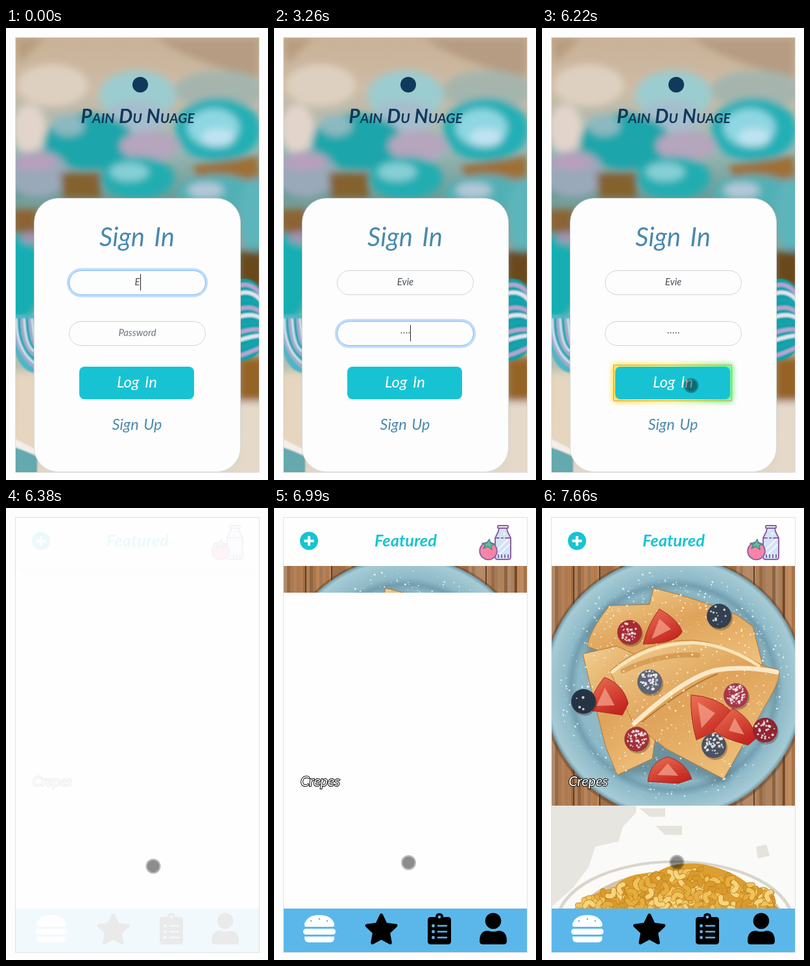
These frames come from a looping animation (404 by 694 pixels, 8 s). An HTML page:

```html
<!DOCTYPE html>
<html lang="en">
<head>
<meta charset="utf-8">
<title>Recipe app sign in</title>
<style>
html, body { margin: 0; width: 100%; height: 100%; overflow: hidden; background: #fdfdfd; }
svg { display: block; }
text { font-family: Lato, "Open Sans", sans-serif; font-style: italic; }
.mid { text-anchor: middle; }
.field { fill: #fdfdfd; stroke: #ced4da; }
.ring rect { fill: none; stroke: #80bdff; }
.ring rect:first-child { stroke: #007bff; stroke-opacity: .25; stroke-width: 3.2; }
.typed { font-size: 15px; fill: #495057; }
.dots { font: 6.65px "Liberation Mono", monospace; fill: #495057; }
.caret { fill: #222; }
</style>
</head>
<body>
<svg width="404" height="694" viewBox="0 0 404 694">
<defs>
  <clipPath id="screen"><rect x="15" y="15" width="375" height="667"/></clipPath>
  <clipPath id="crepeClip"><rect id="crepeWindow" x="15" y="89" width="375" height="41"/></clipPath>
  <clipPath id="pastaClip"><rect x="15" y="457" width="375" height="158"/></clipPath>
  <filter id="soft" x="-30%" y="-30%" width="160%" height="160%"><feGaussianBlur stdDeviation="6"/></filter>
  <filter id="edge" x="-30%" y="-30%" width="160%" height="160%"><feGaussianBlur stdDeviation="1.2"/></filter>
  <filter id="glowBlur" x="-20%" y="-50%" width="140%" height="200%"><feGaussianBlur stdDeviation="4"/></filter>
  <linearGradient id="tan" x2="0" y2="1">
    <stop stop-color="#c9b296"/><stop offset=".12" stop-color="#cdbba6"/>
    <stop offset=".25" stop-color="#9cb9b5"/><stop offset=".36" stop-color="#6f9c98"/><stop offset="1" stop-color="#e3d6c5"/>
  </linearGradient>
  <linearGradient id="glow"><stop stop-color="#ffd21c"/><stop offset=".45" stop-color="#f3ee55"/><stop offset="1" stop-color="#4cf06a"/></linearGradient>
  <linearGradient id="golden" x2=".7" y2="1">
    <stop stop-color="#f2d193"/><stop offset=".5" stop-color="#dfa35a"/><stop offset="1" stop-color="#eec07b"/>
  </linearGradient>
  <radialGradient id="plate">
    <stop stop-color="#9cc3cf"/><stop offset=".74" stop-color="#8db8c6"/><stop offset=".79" stop-color="#739fb0"/>
    <stop offset=".84" stop-color="#8fbac8"/><stop offset=".97" stop-color="#a6cbd5"/><stop offset="1" stop-color="#6f98a8"/>
  </radialGradient>
  <linearGradient id="berryRed" x2=".6" y2="1"><stop stop-color="#ec7254"/><stop offset="1" stop-color="#c32620"/></linearGradient>
</defs>

<g clip-path="url(#screen)">
  <g id="login">
    <rect x="15" y="15" width="375" height="667" fill="url(#tan)"/>
    <g filter="url(#soft)">
      <path d="M230 15H390V75Q300 60 230 15Z" fill="#b59c82"/>
      <path d="M15 15H60L20 55Z" fill="#b79d80"/>
      <ellipse cx="72" cy="88" rx="54" ry="32" fill="#ded0c0"/>
      <ellipse cx="36" cy="155" rx="26" ry="38" fill="#e2d4cb"/>
      <ellipse cx="330" cy="95" rx="70" ry="30" fill="#a5b5ad"/>
      <ellipse cx="203" cy="103" rx="59" ry="38" fill="#9bcccf"/>
      <ellipse cx="200" cy="137" rx="48" ry="25" fill="#a6bdcc"/>
      <ellipse cx="128" cy="175" rx="70" ry="43" fill="#1aa5aa"/>
      <ellipse cx="96" cy="150" rx="25" ry="16" fill="#8bb9c1"/>
      <ellipse cx="222" cy="181" rx="46" ry="23" fill="#b5a5bd"/>
      <ellipse cx="327" cy="156" rx="66" ry="49" fill="#22afb5"/>
      <ellipse cx="320" cy="153" rx="40" ry="29" fill="#8ed7e2"/>
      <ellipse cx="327" cy="168" rx="25" ry="14" fill="#bfe3f1"/>
      <ellipse cx="50" cy="224" rx="46" ry="36" fill="#9aa9b9"/>
      <ellipse cx="46" cy="206" rx="32" ry="12" fill="#b99fbd"/>
      <path d="M84 222H146V262H88Z" fill="#84622f"/>
      <path d="M288 211L390 196V232L300 240Z" fill="#9e7036"/>
      <ellipse cx="203" cy="230" rx="57" ry="33" fill="#23adb1"/>
      <ellipse cx="190" cy="221" rx="30" ry="14" fill="#86cfd6"/>
      <ellipse cx="326" cy="253" rx="62" ry="28" fill="#51b0b5"/>
      <ellipse cx="308" cy="249" rx="28" ry="12" fill="#b4c8d8"/>
      <ellipse cx="384" cy="287" rx="25" ry="56" fill="#5cb5bb"/>
      <path d="M10 278H50V324H10Z" fill="#8b6433"/>
      <ellipse cx="20" cy="382" rx="38" ry="67" fill="#12aeb2"/>
      <ellipse cx="38" cy="322" rx="15" ry="9" fill="#a594b4"/>
      <path d="M358 342H400V398H358Z" fill="#69491f"/>
      <path d="M358 505H400V573H358Z" fill="#966326"/>
      <path d="M358 573H400V690H358Z" fill="#e5d9c9"/>
      <path d="M10 528H50V650H10Z" fill="#e6d6bf"/>
    </g>
    <g filter="url(#edge)">
      <path d="M12 440H48V530Q18 528 12 485Z" fill="#4fb6c3"/>
      <path d="M356 386Q390 380 396 415V490Q382 512 356 512Z" fill="#10a1a9"/>
      <g id="frosting" fill="none" stroke-width="6"/>
      <path d="M12 641L48 658V686H12Z" fill="#64a9ae"/>
      <path d="M12 630L64 656V662L12 643Z" fill="#f4eee8"/>
    </g>
    <circle cx="207" cy="87" r="12" fill="#10395c"/>
    <text class="mid" x="203" y="146" font-size="30" font-weight="700" fill="#10395c" style="font-variant:small-caps">Pain Du Nuage</text>

    <rect x="43.500" y="261.500" width="318" height="420" rx="37" fill="#fdfdfd" stroke="#dadada"/>
    <text class="mid" x="202" y="335" font-size="40" word-spacing="5" fill="#4a89ae">Sign In</text>
    <rect class="field" x="97.500" y="372.500" width="210" height="37" rx="18.500"/>
    <rect class="field" x="97.500" y="450.500" width="210" height="37" rx="18.500"/>
    <g class="ring" id="nameRing"><rect x="95.400" y="370.400" width="214.200" height="41.200" rx="20.600"/><rect x="97.500" y="372.500" width="210" height="37" rx="18.500"/></g>
    <g class="ring" id="passRing"><rect x="95.400" y="448.400" width="214.200" height="41.200" rx="20.600"/><rect x="97.500" y="450.500" width="210" height="37" rx="18.500"/></g>
    <text class="mid typed" id="name" x="202.500" y="395"></text>
    <text class="mid" id="hint" x="202.500" y="473" font-size="14.800" fill="#6c757d">Password</text>
    <text class="mid dots" id="pass" x="202.500" y="470"></text>
    <rect class="caret" id="nameCaret" y="378" width="1" height="25"/>
    <rect class="caret" id="passCaret" y="456" width="1" height="25"/>

    <g id="glowBox"><rect x="109" y="516" width="185" height="58" rx="5" fill="url(#glow)" filter="url(#glowBlur)"/></g>
    <rect x="113" y="520" width="177" height="50" rx="8" fill="#17c3d3"/>
    <rect id="outline" x="110.500" y="517.500" width="182" height="55" fill="none" stroke="#e3a03c"/>
    <text class="mid" x="202" y="552" font-size="24" word-spacing="3" fill="#fff">Log In</text>
    <text class="mid" x="202" y="617" font-size="23.500" word-spacing="2" fill="#4a89ae">Sign Up</text>
  </g>

  <g id="home">
    <rect x="15" y="15" width="375" height="667" fill="#fefefe"/>
    <g id="page">
      <path id="shade" d="M15 89H390V94Q378 107 330 107H75Q27 107 15 94Z" fill="#e9e9e9"/>
      <g id="crepes" clip-path="url(#crepeClip)">
        <g id="planks"/>
        <circle cx="203" cy="276" r="204" fill="#513820" opacity=".4"/>
        <circle cx="203" cy="275" r="200" fill="url(#plate)"/>
        <path d="M68 225L72 190L104 150L166 148L172 123L300 164L326 186L342 246L364 268L282 424L232 410L120 410Z" fill="#41606c" opacity=".45" filter="url(#soft)"/>
        <g fill="url(#golden)" stroke="#b97832" stroke-width="1">
          <path d="M70 213Q72 190 104 150L166 148L172 123Q240 139 302 165L325 182L340 240L210 260Z"/>
          <path d="M63 224L115 212L190 245L170 385L116 410L98 366L72 262Z"/>
          <path d="M105 250Q160 202 232 203Q282 207 340 242L364 248Q370 258 352 290L280 416L192 370L140 330Z"/>
        </g>
        <g fill="none" stroke-linecap="round">
          <path d="M108 252Q164 206 236 207Q284 210 334 242" stroke="#f9e4b7" stroke-width="5"/>
          <path d="M142 331Q220 260 268 249Q312 242 362 252" stroke="#fae9c7" stroke-width="7"/>
          <path d="M152 330Q222 274 270 255" stroke="#b97734" stroke-width="2"/>
          <path d="M125 250Q185 222 240 226" stroke="#c98639" stroke-width="8" opacity=".55"/>
        </g>
        <g id="sugar" fill="#fff"/>
        <g fill="url(#berryRed)" stroke="#a82820">
          <path d="M181 155Q211 172 216 190Q208 208 156 209Q162 180 181 155Z"/>
          <path d="M96 260Q125 270 133 300L124 318L70 310Q78 282 96 260Z"/>
          <path d="M230 287Q270 290 292 312L278 338L238 356Q228 319 230 287Z"/>
          <path d="M294 307Q325 325 330 354L318 364Q278 354 264 341Z"/>
          <path d="M163 420Q166 390 194 382Q222 390 231 416L210 423Z"/>
        </g>
        <g fill="#f5a18a"><path d="M181 170L199 186L169 201ZM97 276L112 303L84 304ZM240 298L267 315L246 338ZM297 322L312 348L288 342ZM178 410L194 392L210 411Z" opacity=".75"/></g>
        <g id="berries"/>
      </g>
      <g id="pasta" clip-path="url(#pastaClip)">
        <rect x="15" y="457" width="375" height="158" fill="#fafaf8"/>
        <path d="M15 457H145V468L125 489L118 512L82 520L72 551L48 583L15 612Z" fill="#e6e5e0"/>
        <path d="M150 461H190V474H166ZM175 488H216V502H190ZM330 520L346 517L351 534L333 538Z" fill="#e5e3dc"/>
        <ellipse cx="205" cy="636" rx="184" ry="95" fill="#d9d5cc"/>
        <ellipse cx="205" cy="639" rx="180" ry="94" fill="#fbfaf7"/>
        <ellipse cx="212" cy="641" rx="163" ry="85" fill="#d6c4a6"/>
        <path d="M50 615Q76 590 112 583Q126 560 176 560Q205 541 248 547Q292 555 319 578Q346 592 364 615Z" fill="#dc9e31"/>
        <g id="noodles" fill="none" stroke-linecap="round"/>
      </g>
      <text x="41" y="427" font-size="21.500" fill="#fff" stroke="#111" stroke-width="2" paint-order="stroke">Crepes</text>

      <circle cx="54" cy="50.500" r="14" fill="#17c3d3"/>
      <path d="M54 43V58M46.500 50.500H61.500" stroke="#fff" stroke-width="4"/>
      <text class="mid" x="203" y="59" font-size="25.500" font-weight="700" fill="#17c3d3">Featured</text>
      <g stroke="#8b62a3" stroke-width="2" stroke-linejoin="round" stroke-linecap="round">
        <path d="M347 31H359L360 36L365 46V75Q365 79 361 79H345Q341 79 341 75V46L346 36Z" fill="#d3e3f5"/>
        <path d="M345 64L362 47M347 72L363 56" stroke="#f4f9ff"/>
        <path d="M342 46H347M351 46H353M357 46H364M346 72V76M351 72V76M356 72V76M361 72V76" fill="none"/>
        <rect x="345" y="27" width="16" height="4" rx="1" fill="#eee4f5"/>
        <circle cx="330.500" cy="66" r="13.300" fill="#f984a8"/>
        <path d="M321 54L328 54L332 48L334 54L340 55L335 58L336 64L330 59L323 62L326 57Z" fill="#68b9a0" stroke="#498a82" stroke-width="1.500"/>
      </g>
      <circle cx="355" cy="39" r="1.500" fill="#fff"/>

      <rect x="15" y="615" width="375" height="67" fill="#5bb7ea"/>
      <g fill="#fff">
        <path d="M50 643Q46 643 47 638Q52 625 70 625Q88 625 93 638Q94 643 90 643Z"/>
        <rect x="45" y="646" width="50" height="9" rx="4.500"/>
        <path d="M47 658H93V660Q93 667 86 667H54Q47 667 47 660Z"/>
      </g>
      <path d="M57 634h.1M70 631h.1M82 634h.1" stroke="#5bb7ea" stroke-width="2.500" stroke-linecap="round"/>
      <path id="star" stroke="#000" stroke-width="5" stroke-linejoin="round"/>
      <rect x="237" y="628" width="36" height="42" rx="4.500"/>
      <path d="M246 637V628H249Q249 622 255 622Q261 622 261 628H264V637Z"/>
      <circle cx="255" cy="628" r="2.300" fill="#5bb7ea"/>
      <path d="M253 641.500H266M253 650.500H266M253 659.500H266" stroke="#5bb7ea" stroke-width="2.600" stroke-linecap="round"/>
      <path d="M245.500 641.500h.1M245.500 650.500h.1M245.500 659.500h.1" stroke="#5bb7ea" stroke-width="4.800" stroke-linecap="round"/>
      <circle cx="338" cy="634" r="12.300"/>
      <path d="M317 665Q317 649 330 649Q338 652 346 649Q359 649 359 665Q359 670 354 670H322Q317 670 317 665Z"/>
    </g>
    <g id="status">
      <path d="M15 661H135Q138 661 138 664V682H15Z" fill="#35363a" opacity=".28"/>
      <text x="20" y="676" font-size="12" fill="#dcebf2" style="font-family:'Open Sans',sans-serif;font-style:normal">Waiting for paindu...</text>
    </g>
  </g>
</g>
<rect x="14.500" y="14.500" width="376" height="668" fill="none" stroke="#e0e0e0"/>
<g id="pointer"><circle r="11.500" fill="#000" opacity=".27"/><circle r="9.300" fill="#000" opacity=".24"/></g>
</svg>

<script>
const LOOP = 8000;
const $ = id => document.getElementById(id);

let seed = 7;
const rand = (lo = 0, hi = 1) => {
  seed = seed * 16807 % 2147483647;
  return lo + (hi - lo) * seed / 2147483647;
};

function add(parent, tag, attrs) {
  const el = document.createElementNS('http://www.w3.org/2000/svg', tag);
  for (const key in attrs) el.setAttribute(key, attrs[key]);
  parent.append(el);
}

function drawFrosting() {
  const colors = ['#b9a3d0', '#e1e6ef', '#16a2ad'];
  for (let i = 0; i < 10; i++) {
    const y = 396 + i * 12;
    const stroke = colors[i % 3];
    add($('frosting'), 'path', { d: `M358 ${y}Q382 ${y - 8} 397 ${y + 20 - i * 4}`, stroke });
    if (i < 8) add($('frosting'), 'path', { d: `M${12 + i * 4} 446Q${10 + i * 5} 498 50 ${526 - i * 7}`, stroke, 'stroke-width': 3 });
  }
}

function drawPlanks() {
  for (let x = 15; x < 390; x += 5) {
    add($('planks'), 'rect', { x, y: 89, width: 6, height: 368, fill: `hsl(27 ${rand(30, 43)}% ${rand(40, 57)}%)` });
  }
  for (const x of [48, 88, 326, 372]) add($('planks'), 'rect', { x, y: 89, width: 2, height: 368, fill: '#633e24' });
}

function drawSugar() {
  for (let i = 0; i < 750; i++) {
    const angle = rand(0, 2 * Math.PI), far = 178 * Math.sqrt(rand());
    add($('sugar'), 'circle', {
      cx: 203 + far * Math.cos(angle), cy: 272 + far * Math.sin(angle),
      r: rand(.4, 1.5), opacity: rand(.4, .9)
    });
  }
}

function drawBerry(x, y, color, dust) {
  const r = 19;
  add($('berries'), 'circle', { cx: x + 2, cy: y + 3, r, fill: '#47301f', opacity: .35 });
  add($('berries'), 'circle', { cx: x, cy: y, r, fill: color });
  for (let i = 0; i < dust; i++) {
    const angle = rand(0, 2 * Math.PI), far = 15 * Math.sqrt(rand());
    add($('berries'), 'circle', {
      cx: x + far * Math.cos(angle), cy: y - 2 + far * Math.sin(angle), r: rand(.8, 2.2), fill: '#f5f0f2', opacity: .8
    });
  }
}

function drawNoodles() {
  const colors = ['#e6ae3d', '#f0c35a', '#f6d57c', '#d99a2c'];
  for (let i = 0; i < 190; i++) {
    const x = rand(62, 352);
    const top = 558 + 50 * Math.pow(Math.abs(x - 225) / 165, 1.5);
    const y = rand(top, 620), turn = rand(0, 360);
    const base = { d: 'M-6 3Q0 -7 7 2', transform: `translate(${x} ${y}) rotate(${turn})` };
    add($('noodles'), 'path', { ...base, stroke: '#bf7d1f', 'stroke-width': 8.5 });
    add($('noodles'), 'path', { ...base, stroke: colors[i % 4], 'stroke-width': 7 });
  }
}

function drawStar() {
  const points = Array.from({ length: 10 }, (_, i) => {
    const r = i % 2 ? 11.5 : 23.5, a = i * Math.PI / 5;
    return `${165.5 + r * Math.sin(a)} ${648.5 - r * Math.cos(a)}`;
  });
  $('star').setAttribute('d', `M${points.join('L')}Z`);
}

drawFrosting();
drawPlanks();
drawSugar();
[[273, 166, '#34404f', 12], [64, 297, '#263344', 4], [166, 267, '#5c6475', 60], [265, 365, '#4a5361', 45],
 [135, 191, '#a62c32', 30], [146, 355, '#a23038', 45], [299, 288, '#a7384a', 60], [344, 341, '#8e2531', 28]]
  .forEach(berry => drawBerry(...berry));
drawNoodles();
drawStar();

// Each track lists [start in ms, value]; a value holds until the next start.
const tracks = {
  name: [[0, 'E'], [280, 'Ev'], [680, 'Evi'], [1080, 'Evie']],
  nameRing: [[0, 1], [1640, .4], [1790, 0]],
  nameCaret: [[0, 1], [1640, 0]],
  passRing: [[0, 0], [1640, .6], [1790, 1], [5710, .6], [5830, .2], [5960, 0]],
  passCaret: [[0, 0], [1790, 1], [2190, 0], [2310, 1], [3790, 0], [3940, 1], [4360, 0], [4860, 1], [5440, 0]],
  dots: [[0, 0], [2190, 1], [2740, 2], [2990, 3], [3260, 4], [3940, 5]],
  outline: [[0, 0], [5710, .4], [5830, .8], [5960, 1]],
  glowBox: [[0, 0], [5960, .2], [6100, .6], [6220, 1]],
  home: [[0, 0], [6380, 1]],
  page: [[0, 0], [6380, .08], [6530, .32], [6690, .565], [6840, .82], [6990, 1]],
  shade: [[0, 1], [6990, 0]],
  status: [[0, 0], [6530, 1], [6840, .5], [6990, 0]],
  crepes: [[0, 0], [6990, 1]],
  crepeHeight: [[0, 41], [7660, 368]],
  pasta: [[0, 0], [7260, 1]],
  pointer: [[0, 0], [5290, 1]],
  spot: [[0, [231.5, 565.5]], [5440, [231, 560]], [5560, [230, 549]], [6380, [227, 550]], [6530, [221, 551]],
         [6690, [215.5, 551.5]], [6840, [211, 548]], [6990, [207.5, 544.5]], [7140, [208, 544]]]
};
const faded = ['nameRing', 'nameCaret', 'passRing', 'passCaret', 'outline', 'glowBox', 'home', 'page', 'shade',
               'status', 'crepes', 'pasta', 'pointer'];

const value = (track, t) => tracks[track].findLast(([start]) => start <= t)[1];

function type(field, caret, content) {
  if (field.textContent !== content) field.textContent = content;
  const width = content ? field.getComputedTextLength() : 0;
  caret.setAttribute('x', Math.round(202.5 + width / 2));
}

function draw() {
  const t = performance.now() % LOOP;
  for (const id of faded) $(id).style.opacity = value(id, t);
  const dots = value('dots', t);
  type($('name'), $('nameCaret'), value('name', t));
  type($('pass'), $('passCaret'), '•'.repeat(dots));
  $('hint').style.opacity = dots ? 0 : 1;
  $('crepeWindow').setAttribute('height', value('crepeHeight', t));
  $('pointer').setAttribute('transform', `translate(${value('spot', t)})`);
  requestAnimationFrame(draw);
}
draw();
</script>
</body>
</html>
```
